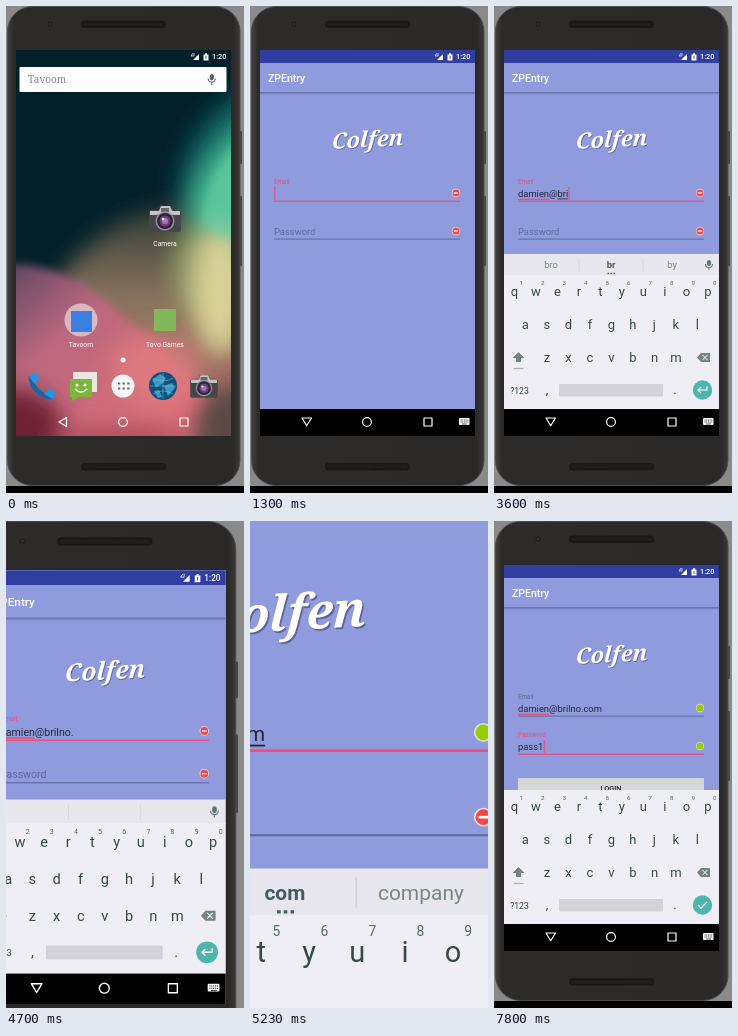
Write an HTML page that moves like this. It is 238 by 487 pixels and loops after 8 s.

```html
<!DOCTYPE html>
<html lang="en">
<head>
<meta charset="utf-8">
<title>Login form demo</title>
<style>
html, body { margin: 0; width: 100%; height: 100%; overflow: hidden; background: #8a8a8a; }
svg { display: block; width: 100vw; height: 100vh; font-family: Roboto, "Open Sans", sans-serif; }
.mid { text-anchor: middle; }
.line { fill: none; stroke: #fff; stroke-width: 1.2; stroke-linejoin: round; }
</style>
</head>
<body>
<svg viewBox="0 0 238 487">
  <defs>
    <clipPath id="screenClip"><rect x="10" y="44" width="215" height="386"/></clipPath>
    <clipPath id="boardClip"><rect x="10" y="44" width="215" height="359"/></clipPath>
    <filter id="soft" x="-40%" y="-40%" width="180%" height="180%"><feGaussianBlur stdDeviation="11"/></filter>
    <filter id="haze" x="-40%" y="-40%" width="180%" height="180%"><feGaussianBlur stdDeviation="4"/></filter>
    <linearGradient id="body">
      <stop offset="0" stop-color="#403f3e"/><stop offset=".03" stop-color="#2c2b2a"/>
      <stop offset=".97" stop-color="#2a2928"/><stop offset="1" stop-color="#3a3938"/>
    </linearGradient>
    <linearGradient id="shade" x2="0" y2="1">
      <stop offset="0" stop-color="#222a55" stop-opacity=".4"/><stop offset="1" stop-color="#222a55" stop-opacity="0"/>
    </linearGradient>
    <linearGradient id="dome" x2="0" y2="1">
      <stop offset="0" stop-color="#2f3c34"/><stop offset=".4" stop-color="#8c7560"/><stop offset="1" stop-color="#b06a66"/>
    </linearGradient>
    <linearGradient id="rose" x2=".8" y2=".7">
      <stop offset="0" stop-color="#5c4660"/><stop offset=".4" stop-color="#b8667e"/><stop offset="1" stop-color="#dc7079"/>
    </linearGradient>
    <g id="camera">
      <path d="M-10 -9 H-6 L-5 -13 H6 L7 -9 H14 Q16 -9 16 -6 V11 Q16 13 14 13 H-14 Q-16 13 -16 11 V-6 Q-16 -9 -14 -9Z" fill="#46464a"/>
      <path d="M-15 -8 H-6 L-4 -13 H5 L7 -8 H15 V-4 H-15Z" fill="#c4c4c4"/>
      <rect x="-4" y="-11" width="8" height="4" fill="#66666a"/>
      <circle cy="2" r="9.5" fill="#96939a"/><circle cy="2" r="8" fill="#2c2434"/>
      <circle cy="2" r="5.6" fill="#6b3f7d"/><circle cy="2" r="3" fill="#a777b5"/><circle cx="-2" cy="0" r="1.3" fill="#eadff0"/>
    </g>
    <g id="bad">
      <circle r="4.2" fill="#f3dfe6"/><circle r="3.5" fill="#f04848"/><rect x="-2.2" y="-.6" width="4.4" height="1.2" fill="#fff"/>
    </g>
    <g id="good"><circle r="4.2" fill="#dfe6cf"/><circle r="3.5" fill="#99cc00"/></g>
  </defs>

  <rect width="238" height="487" fill="#8a8a8a"/>
  <g id="stage">
    <rect y="480" width="238" height="7" fill="#000"/>
    <rect x="233" y="125" width="3" height="33" rx="1" fill="#484848"/>
    <rect x="233" y="190" width="3" height="70" rx="1" fill="#484848"/>
    <rect x="1.500" y=".5" width="232.500" height="479" rx="25" fill="url(#body)" stroke="#4a4a4a"/>
    <circle cx="44" cy="18" r="2.600" fill="#222"/><circle cx="44" cy="18" r="1" fill="#38383c"/>
    <g fill="#1b1b1b" stroke="#141414" stroke-width=".6">
      <rect x="75.500" y="15" width="84" height="6.500" rx="2.500"/><rect x="75.500" y="457.500" width="84" height="6.500" rx="2.500"/>
    </g>
    <path d="M79 18.200H157M79 460.700H157" stroke="#2a2a2a" stroke-width="1.600" stroke-dasharray="1.200 1.400"/>

    <g clip-path="url(#screenClip)">
      <g id="home">
        <rect x="10" y="44" width="215" height="386" fill="#03202a"/>
        <g filter="url(#soft)">
          <path d="M250 75 C205 100 176 135 172 180 V240 H250Z" fill="#0d5f60"/>
          <path d="M55 270 C90 225 130 200 180 200 H250 V440 H55Z" fill="url(#dome)"/>
          <path d="M250 110 C212 135 188 170 184 205 L205 290 H250Z" fill="#3fb48f"/>
          <ellipse cx="190" cy="265" rx="22" ry="42" fill="#8f9a66"/>
          <ellipse cx="214" cy="285" rx="26" ry="62" fill="#d9d196"/>
        </g>
        <path d="M240 130 C214 150 199 180 195 215 C206 230 220 235 240 230Z" fill="#6fd3a8" opacity=".55" filter="url(#haze)"/>
        <path d="M0 258 C50 258 80 276 115 308 C150 340 195 362 225 440 H0Z" fill="url(#rose)" filter="url(#haze)"/>
        <g filter="url(#soft)">
          <ellipse cx="150" cy="360" rx="46" ry="34" fill="#e07d80" opacity=".75"/>
          <ellipse cx="8" cy="425" rx="50" ry="42" fill="#6e2436"/>
          <ellipse cx="226" cy="424" rx="38" ry="44" fill="#5a4a44"/>
          <ellipse cx="115" cy="432" rx="70" ry="12" fill="#a84c5c"/>
        </g>
        <rect x="13.500" y="61" width="207" height="25" rx="1" fill="#fdfdfd"/>
        <text x="22" y="77" font-family="Noto Serif, serif" font-size="10" fill="#8b8b8b">Tavoom</text>
        <g fill="none" stroke="#5d5d5d"><rect x="204.300" y="68.500" width="3" height="5.500" rx="1.500" fill="#5d5d5d"/><path d="M202 72.500a3.800 3.800 0 0 0 7.600 0M205.800 76.500V79"/></g>
        <use href="#camera" x="159" y="213"/>
        <circle cx="75" cy="314" r="16.500" fill="#e0cdd0" opacity=".8"/>
        <rect x="65" y="305" width="21" height="21" fill="#3b7de0"/>
        <rect x="148" y="303" width="22" height="22" fill="#83b85a"/>
        <g class="mid" font-size="6.800" fill="#fff">
          <text x="159" y="240">Camera</text><text x="75" y="341">Tavoom</text><text x="159" y="341">Tovo Games</text>
        </g>
        <circle cx="117" cy="354" r="2.500" fill="#fff"/>
        <path d="M25 370 C26 383 35 391 47 391" fill="none" stroke="#1668a8" stroke-width="5"/>
        <path d="M23 371l6-5 5 6-5 6zM38 388l5-6 7 4-3 7z" fill="#2f92dc"/>
        <path d="M67 366H91V386H67Z" fill="#e8e8e0"/><path d="M64 373H86V391H73L66 395V391H64Z" fill="#7cb63c"/>
        <circle cx="71" cy="379" r="1.500" fill="#fff"/><circle cx="79" cy="379" r="1.500" fill="#fff"/>
        <path d="M69 383q6 6 12 0" class="line"/>
        <circle cx="117" cy="380" r="11.500" fill="#f6f4f4"/>
        <path d="M112 377.500h12M112 382.500h12" stroke="#666" stroke-width="2.200" stroke-dasharray="2.200 2.400"/>
        <circle cx="157" cy="380" r="14" fill="#12507c"/>
        <path d="M146 374l8-6 6 4-4 6-6 3zM158 380l8-3 3 5-7 8zM148 385l5-1 3 7-4 1z" fill="#3d9ac4"/>
        <path d="M144 380h26M157 367v26M147 372q10 6 20 0M147 388q10-6 20 0" stroke="#78c8e8" stroke-width=".5" fill="none"/>
        <use href="#camera" transform="translate(198 380.500) scale(.86)"/>
      </g>

      <g id="app">
        <rect x="10" y="44" width="215" height="386" fill="#8f9bdc"/>
        <rect x="10" y="44" width="215" height="13" fill="#303f9f"/>
        <rect x="10" y="86" width="215" height="3" fill="url(#shade)"/>
        <text x="18" y="75.500" font-size="10.460" font-weight="500" fill="#fff">ZPEntry</text>
        <g class="mid" font-family="Noto Serif, serif" font-size="22" font-weight="600" font-style="italic">
          <text transform="translate(118 142) rotate(-3) skewX(-6)" fill="#5f659c">Colfen</text>
          <text transform="translate(117.300 141.200) rotate(-3) skewX(-6)" fill="#fff">Colfen</text>
        </g>
        <g id="button">
          <rect x="24" y="257" width="186" height="24" rx="1" fill="#d6d7d7"/>
          <text class="mid" x="117" y="269.800" font-size="7.320" font-weight="500" fill="#222">LOGIN</text>
        </g>
        <g id="fields"></g>
        <rect x="10" y="403" width="215" height="27" fill="#000"/>
      </g>

      <g clip-path="url(#boardClip)"><g id="board">
        <g id="strip">
          <rect x="10" y="248" width="215" height="22" fill="#e8e7ed"/>
          <path d="M85 252V266M149 252V266" stroke="#d3d3da" stroke-width=".7"/>
          <g class="mid" font-size="9.400" fill="#78858c">
            <text class="hint" x="57" y="262.300"></text>
            <text class="hint" x="117" y="262.300" fill="#455a64" font-weight="700"></text>
            <text class="hint" x="178" y="262.300"></text>
          </g>
          <path id="dots" d="M113.500 267.500h8" stroke="#455a64" stroke-width="1.500" stroke-dasharray="1.600 1.400"/>
          <g fill="none" stroke="#66757d" stroke-width="1.100"><rect x="213.500" y="254.500" width="3" height="5" rx="1.500" fill="#66757d"/><path d="M211.500 258a3.500 3.500 0 0 0 7 0M215 261.500V264"/></g>
        </g>
        <rect x="10" y="269" width="215" height="134" fill="#efeef4"/>
        <g id="keys" class="mid" font-size="13" fill="#37474f"></g>
        <path d="M24.500 346l6 6h-3.500v4h-5v-4h-3.500z" fill="#75828a"/><path d="M19.500 362.500h10" stroke="#aab3b8" stroke-width="1.300"/>
        <path d="M203 351.500l4-4.500h9v9h-9z" fill="#75828a"/><path d="M208.500 349l5 5m0-5l-5 5" stroke="#fff"/>
        <rect x="65" y="378" width="104" height="12.500" rx="1" fill="#d2d2d8"/>
        <circle cx="208.500" cy="384" r="9.700" fill="#4db6ac"/>
        <path id="enter" class="line" d="M213 380.500v3.500h-9m3-3l-3 3 3 3"/>
        <path id="check" class="line" d="M204 384l3 3 6-6"/>
      </g></g>

      <g fill="#fff">
        <path d="M187 54l6-6v6z"/><path d="M188 47v3h-3l2-3" fill="none" stroke="#fff" stroke-width=".7"/>
        <path d="M197.500 48.500h1.500v-1.200h2v1.200h1.500v6h-5z"/><path d="M200 49.800v3" stroke="#556" stroke-width="1"/>
        <text x="206" y="53.400" font-size="7.320" font-weight="500">1:20</text>
      </g>
      <path id="back" class="line" d="M60.500 411.500V420.500L53 416Z"/>
      <path id="down" class="line" d="M52 412H61.500L56.700 419.800Z"/>
      <circle class="line" cx="117" cy="416" r="4.400"/><rect class="line" x="174" y="412" width="8" height="8"/>
      <g id="kbIcon"><rect x="209" y="412" width="10.500" height="7" rx="1" fill="#fff"/>
        <path d="M210.500 414h8M210.500 416h8" stroke="#111" stroke-width=".9" stroke-dasharray="1 .7"/><path d="M212 418h5" stroke="#111" stroke-width=".7"/></g>
    </g>
  </g>
</svg>
<script>
const LOOP = 8000, PINK = "#f5487f", GREY = "#616a9c", SIZE = 9.4, LEFT = 24;
const $ = id => document.getElementById(id);

function add(parent, tag, attrs, text) {
  const el = document.createElementNS("http://www.w3.org/2000/svg", tag);
  set(el, attrs);
  if (text) el.textContent = text;
  return parent.appendChild(el);
}
function set(el, attrs) { for (const k in attrs) el.setAttribute(k, attrs[k]); }
function show(el, on) { el.style.display = on ? "" : "none"; }
const lerp = (a, b, p) => a + (b - a) * p;
const ramp = (t, a, b) => Math.min(1, Math.max(0, (t - a) / (b - a)));
const smooth = p => p * p * (3 - 2 * p);
const decel = p => 1 - (1 - p) ** 3;

function buildKeys() {
  const rows = [["qwertyuiop", 20.4, 290], ["asdfghjkl", 31.4, 323], ["zxcvbnm", 53, 356]];
  for (const [row, x0, y] of rows)
    [...row].forEach((c, i) => add($("keys"), "text", { x: x0 + i * 21.5, y }, c));
  for (let i = 0; i < 10; i++)
    add($("keys"), "text", { x: 27.2 + i * 21.5, y: 278.5, "font-size": 6.2, fill: "#56666e" }, String((i + 1) % 10));
  add($("keys"), "text", { x: 25.5, y: 387.5, "font-size": 8.6 }, "?123");
  add($("keys"), "text", { x: 53, y: 388 }, ",");
  add($("keys"), "text", { x: 181, y: 388 }, ".");
}

function makeField(name, base) {
  const g = $("fields");
  return {
    base,
    label: add(g, "text", { x: LEFT }, name),
    text: add(g, "text", { x: LEFT, y: base, "font-size": SIZE, fill: "#22263a" }),
    spell: add(g, "rect", { x: LEFT, y: base + 1.7, height: 1.2, fill: "#e8506a" }),
    word: add(g, "rect", { y: base + 1.5, height: .8, fill: "#22263a" }),
    line: add(g, "rect", { x: LEFT, width: 186 }),
    caret: add(g, "rect", { y: base - 10, width: 1.1, height: 13, fill: PINK }),
    bad: add(g, "use", { href: "#bad", x: 206, y: base - 4 }),
    good: add(g, "use", { href: "#good", x: 206, y: base - 4 })
  };
}

function drawField(f, s) {
  set(f.label, {
    y: lerp(f.base, f.base - 12.7, s.float), "font-size": lerp(SIZE, 6.3, s.float),
    fill: s.focus ? PINK : GREY
  });
  f.text.textContent = s.value;
  const width = n => n > 0 ? f.text.getSubStringLength(0, n) : 0;
  const len = s.value.length, at = s.value.indexOf("@");
  const word = s.focus && s.compose ? (s.value.match(/[a-z]+$/) || [""])[0].length : 0;
  const end = width(len), start = width(len - word);
  set(f.spell, { width: width(at) });
  set(f.word, { x: LEFT + start, width: word ? end - start : 0 });
  set(f.line, { y: f.base + 3.6, height: s.focus ? 1.2 : 1, fill: s.focus ? PINK : GREY });
  set(f.caret, { x: LEFT + end + .3 });
  show(f.caret, s.focus && s.blink);
  show(f.bad, !s.valid);
  show(f.good, s.valid);
}

// time, text, suggestions
const EMAIL = [
  [0, "", ""],
  [1700, "d", "do d day"], [1750, "da", "day da dad"], [1800, "dam", "dam dam damp"],
  [1850, "dami", "dam dami damn"], [1900, "damie", "dam damie damn"], [1960, "damien", "dam damien damn"],
  [2740, "damien@", ""],
  [3390, "damien@b", "be b by"], [3480, "damien@br", "bro br by"], [3560, "damien@bri", "bro br by"],
  [3660, "damien@bril", "brim bril bril"], [3760, "damien@briln", "brim briln brick"],
  [3840, "damien@brilno", "brim brilno brick"],
  [4620, "damien@brilno.", ""], [4800, "damien@brilno.c", "can c call"],
  [4900, "damien@brilno.co", "come co of"], [5040, "damien@brilno.com", "come com company"]
];
const PASS = [[0, ""], [7430, "p"], [7490, "pa"], [7570, "pas"], [7650, "pass"], [7740, "pass1"]];
const OFF = [[2230, 2460], [2700, 2740], [3060, 3330], [4130, 4360], [4580, 5660], [6100, 6660]];
const pick = (list, t) => list.filter(e => e[0] <= t).pop();

buildKeys();
const email = makeField("Email", 191), pass = makeField("Password", 229);
const hints = document.querySelectorAll(".hint");

// Zoom towards the end of the email, held against the top edge at first
function camera(t) {
  if (t >= 6100) return "";
  const p = smooth(ramp(t, 4577, 5210)), k = Math.min(1, p / .107) * (1 - p);
  const x = -12.4 * k - 226 * p, y = Math.min(0, 24.6 * (1 - p) - 205.6 * p);
  return p ? `translate(${x} ${y}) scale(${1 + 1.23 * p})` : "";
}

function render(t) {
  set($("stage"), { transform: camera(t) });

  const open = decel(ramp(t, 560, 900));
  show($("app"), open > 0);
  set($("app"), { opacity: open, transform: `translate(0 ${40 * (1 - open)})` });

  const inPass = t >= 6930, blink = !OFF.some(([a, b]) => t >= a && t < b);
  const [, mail, words] = pick(EMAIL, t), secret = pick(PASS, t)[1];
  drawField(email, {
    value: mail, focus: t >= 960 && !inPass, blink, compose: true,
    float: smooth(ramp(t, 960, 1180)), valid: /\.co/.test(mail)
  });
  drawField(pass, {
    value: secret, focus: inPass, blink, float: smooth(ramp(t, 6930, 7130)), valid: secret.length > 4
  });
  show($("button"), secret.length > 4);

  const rise = decel(ramp(t, 1390, 1660));
  show($("board"), rise > 0);
  set($("board"), { transform: `translate(0 ${155 * (1 - rise)})` });
  const list = words.split(" ");
  hints.forEach((h, i) => h.textContent = list[i] || "");
  show($("dots"), words);
  const swapped = t >= 7060;
  show($("strip"), !swapped);
  show($("enter"), !swapped);
  show($("check"), swapped);

  const typing = t >= 1100;
  show($("back"), !typing);
  show($("down"), typing);
  show($("kbIcon"), typing);
}

const began = performance.now();
function tick() {
  render((performance.now() - began) % LOOP);
  requestAnimationFrame(tick);
}
tick();
</script>
</body>
</html>
```
